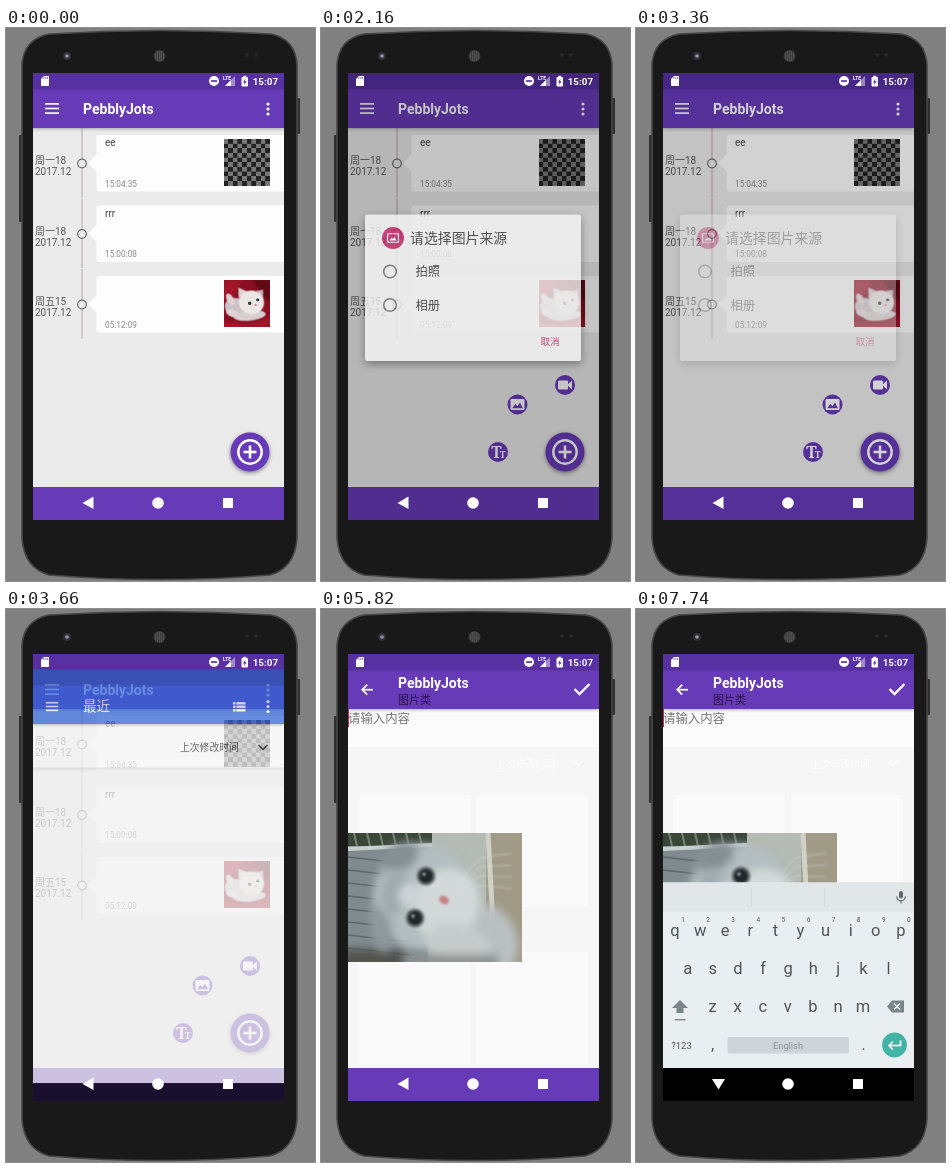
An HTML page with a canvas for the animation above (8000 ms loop, 309 px wide and 553 px high).

```html
<!DOCTYPE html>
<html lang="zh-CN">
<head>
<meta charset="utf-8">
<style>
html, body { margin: 0; width: 100%; height: 100%; overflow: hidden; background: #808080; }
canvas { display: block; width: 309px; height: 553px; }
</style>
</head>
<body>
<canvas id="stage" width="309" height="553"></canvas>
<script>
function makeCanvas(w, h) {
  const c = document.createElement('canvas');
  c.width = w;
  c.height = h;
  return c.getContext('2d');
}
const off = makeCanvas(309, 553);
let g = document.getElementById('stage').getContext('2d');

const FONT = 'Roboto, "Noto Sans CJK SC", "Noto Sans CJK", sans-serif';
const SERIF = '"Noto Serif", serif';
const PURPLE = '#673ab7', PINK = '#c8286a', WHITE = '#fff';
const TITLE = 'PebblyJots';
const clamp = v => Math.max(0, Math.min(1, v));

// Drawing helpers
function rect(x, y, w, h, color, r = 0) {
  g.fillStyle = color;
  g.beginPath();
  g.roundRect(x, y, w, h, r);
  g.fill();
}
function ellipse(x, y, rx, ry, color, turn = 0) {
  g.fillStyle = color;
  g.beginPath();
  g.ellipse(x, y, rx, ry, turn, 0, 7);
  g.fill();
}
const disc = (x, y, r, color) => ellipse(x, y, r, r, color);
function ring(x, y, r, color, width) {
  g.strokeStyle = color;
  g.lineWidth = width;
  g.beginPath();
  g.arc(x, y, r, 0, 7);
  g.stroke();
}
function trace(points) {
  g.beginPath();
  for (let i = 0; i < points.length; i += 2) g.lineTo(points[i], points[i + 1]);
}
function poly(color, ...points) {
  trace(points);
  g.fillStyle = color;
  g.fill();
}
function line(color, width, ...points) {
  trace(points);
  g.strokeStyle = color;
  g.lineWidth = width;
  g.stroke();
}
function text(s, x, y, size, color, weight = 400, align = 'left', family = FONT) {
  g.font = `${weight} ${size}px ${family}`;
  g.textAlign = align;
  g.fillStyle = color;
  g.fillText(s, x, y);
}
function shadow(blur, dy, strength, draw) {
  g.save();
  g.shadowColor = `rgba(0,0,0,${strength})`;
  g.shadowBlur = blur;
  g.shadowOffsetY = dy;
  draw();
  g.restore();
}
// Runs a drawing on another canvas
function drawOn(target, draw) {
  const front = g;
  g = target;
  draw();
  g = front;
  return target.canvas;
}
function layer(alpha, dy, draw) {
  off.clearRect(0, 0, 309, 553);
  drawOn(off, draw);
  g.save();
  g.globalAlpha = alpha;
  g.drawImage(off.canvas, 0, dy);
  g.restore();
}
// Centre-crops a picture into a box
function photo(pic, x, y, w, h) {
  const cut = pic.height * w / h;
  g.drawImage(pic, (pic.width - cut) / 2, 0, cut, pic.height, x, y, w, h);
}
const soften = px => g.filter = px ? `blur(${px}px)` : 'none';

// Pictures
function whiteKitten() {
  rect(0, 0, 110, 110, '#8a0f22');
  soften(3);
  poly('#a3162a', 0, 0, 45, 0, 20, 40, 0, 50);
  poly('#5f0913', 70, 0, 110, 0, 110, 50, 90, 35);
  poly('#a01528', -5, 98, 60, 104, 115, 86, 115, 115, -5, 115);
  soften(1.5);
  ellipse(36, 68, 34, 24, '#cdc3c7', .35);
  ellipse(62, 84, 38, 12, '#d8cfd0', -.1);
  poly('#dcd2d2', 36, 44, 35, 18, 56, 27);
  poly('#cdb7ba', 76, 26, 94, 23, 93, 50);
  ellipse(66, 53, 30, 28, '#ece6e5', .3);
  ellipse(16, 46, 8, 15, '#e0d4d5', -.5);
  ellipse(20, 78, 14, 8, '#e2d5d5', .3);
  soften(.5);
  disc(62, 55, 4, '#34343a');
  disc(81, 47, 3.6, '#34343a');
  ellipse(76, 59, 3, 2, '#d58c90');
  soften(0);
}
function greyCat() {
  rect(0, 0, 174, 129, '#a9b0ae');
  rect(0, 0, 80, 129, '#7f8b8f');
  soften(.7);
  for (let y = 24; y < 140; y += 13) line('#5d686c', 1.5, 0, y, 62, y + 7);
  rect(0, 0, 84, 13, '#39463a');
  for (let x = 6; x < 84; x += 13) line('#78846f', 2, x, 0, x + 3, 13);
  line('#c9d1cf', 4, 0, 16, 84, 12);
  rect(84, 0, 54, 129, '#b4bab4');
  rect(138, 0, 40, 129, '#a09a87');
  line('#cfd0c6', 5, 140, 0, 147, 129);
  soften(4);
  rect(-5, 116, 60, 20, '#54534f');
  ellipse(128, 112, 42, 42, '#b9c0c0', .5);
  ellipse(75, 64, 50, 53, '#b3bec2', .3);
  ellipse(52, 24, 20, 13, '#858f94', -.5);
  ellipse(33, 96, 10, 24, '#8f999d', -.2);
  ellipse(46, 60, 13, 24, '#a0abb0', .2);
  ellipse(98, 72, 33, 37, '#d3d9d9', .4);
  ellipse(110, 112, 34, 20, '#c6cccb', .3);
  ellipse(62, 62, 12, 12, '#ccd4d6');
  rect(60, 122, 90, 14, '#8d9190');
  soften(.8);
  for (const [x, y] of [[78, 43], [67, 85]]) {
    disc(x, y, 9.5, '#6c7472');
    disc(x, y, 7, '#20272a');
    disc(x - 2, y - 2, 1.5, '#cfd7d8');
  }
  ellipse(96, 67, 5, 4, '#c48084', .5);
  for (let i = 0; i < 4; i++) line('#dfe2de', .6, 107, 55 + i * 3, 132, 25 + i * 9, 164, 20 + i * 12);
  soften(0);
}
function checkers(odd) {
  rect(0, 0, 110, 110, '#222');
  for (let i = 0; i < 100; i++) {
    const x = i % 10, y = i / 10 | 0;
    if ((x + y) % 2 == odd) rect(x * 11, y * 11, 11, 11, '#777');
  }
}
function checkerShot() {
  checkers(1);
  rect(0, 88, 110, 22, '#202020');
  rect(87, 0, 23, 27, '#b81f1b');
}
function tabby() {
  rect(0, 0, 110, 110, '#d9b48c');
  soften(3);
  rect(-5, -5, 120, 38, '#e2c69c');
  rect(-5, 88, 120, 30, '#b5764f');
  soften(1.5);
  poly('#9d6c43', 8, 55, 7, 10, 38, 31);
  poly('#9d6c43', 70, 31, 103, 12, 98, 57);
  poly('#c09474', 13, 40, 12, 20, 29, 32);
  poly('#c09474', 79, 34, 97, 22, 94, 44);
  ellipse(55, 58, 48, 34, '#ac7b4c');
  for (let x = 41; x < 74; x += 8) line('#74502f', 3, x, 27, 50 + x * .1, 43);
  ellipse(55, 77, 32, 15, '#d8bd9b');
  ellipse(55, 60, 8, 14, '#c0946a');
  soften(.6);
  for (const [x, y] of [[36, 50], [76, 52]]) {
    disc(x, y, 8, '#cdb883');
    disc(x, y, 5.8, '#252a25');
    disc(x - 2, y - 2, 1.3, WHITE);
  }
  ellipse(55, 67, 5, 3.5, '#b0695a');
  line('#7d583b', 1.3, 45, 77, 55, 72, 65, 77);
  soften(0);
}
const paint = (draw, w = 110, h = 110) => drawOn(makeCanvas(w, h), draw);
const pics = {
  kitten: paint(whiteKitten),
  cat: paint(greyCat, 174, 129),
  board: paint(() => checkers(0)),
  shot: paint(checkerShot),
  tabby: paint(tabby)
};

// Icons
function menuIcon(y, w, gap) {
  for (const d of [-gap, 0, gap]) rect(46 - w / 2, y + d - .8, w, 1.6, WHITE);
}
function moreIcon(y) {
  for (const d of [-5, 0, 5]) disc(262, y + d, 1.6, WHITE);
}
function pictureIcon(x, y, w, frame, hill) {
  rect(x - w / 2, y - w * .4, w, w * .8, frame, 1.3);
  poly(hill, x - w * .38, y + w * .27, x - w * .15, y - w * .03, x, y + w * .12,
    x + w * .18, y - w * .14, x + w * .39, y + w * .27);
}

function phone() {
  rect(0, 0, 309, 553, '#808080');
  rect(13, 107, 4, 87, '#303030', 1);
  rect(290, 70, 4, 36, '#303030', 1);
  const body = new Path2D('M16 36Q18 11 43 6Q154 -1 265 6Q289 11 291 36V510Q289 540 264 547Q154 556 43 547Q18 540 16 510Z');
  g.fillStyle = '#191919';
  g.fill(body);
  g.strokeStyle = '#474747';
  g.lineWidth = 1.6;
  g.stroke(body);
  disc(61, 28, 4, '#303036');
  disc(61, 28, 1.8, '#9296ae');
  disc(153.5, 28, 6, '#3c3c3c');
  for (let y = -4; y <= 4; y += 2)
    for (let x = -4; x <= 4; x += 2)
      if (x * x + y * y < 24) rect(153 + x, 27.5 + y, 1, 1, '#686868');
  disc(241, 27, 1.8, '#2b2b2b');
  disc(250, 27, 1.8, '#2b2b2b');
}

function bars(dark, color, nav) {
  shadow(3, 1, .3, () => rect(27, 61, 251, 39, color));
  rect(27, 45, 251, 16.5, dark);
  rect(27, 459, 251, 34, nav);
}

function systemIcons(down) {
  poly(WHITE, 35, 51, 38, 48, 43, 48, 43, 58, 35, 58);
  for (const x of [37.5, 39.5, 41.3]) rect(x, 49, .8, 2, '#704fae');
  disc(208, 53, 5, WHITE);
  rect(205, 52.2, 6, 1.7, '#5931a4');
  poly('rgba(255,255,255,.45)', 219, 58, 229, 58, 229, 48);
  poly(WHITE, 219, 58, 225, 58, 225, 52);
  text('LTE', 217, 52, 5, WHITE, 700);
  rect(235.5, 49, 6.5, 9.5, WHITE, 1);
  rect(237.3, 47.8, 3, 2, WHITE);
  poly('#5931a4', 239.5, 50.5, 237, 54.5, 238.5, 54.5, 238, 57.3, 240.6, 53.3, 239, 53.3);
  text('15:07', 272, 57, 9.8, WHITE, 700, 'right');
  if (down) poly(WHITE, 76, 470, 89, 470, 82.5, 480.5);
  else poly(WHITE, 76.5, 475, 87.5, 468.5, 87.5, 481);
  disc(152, 475, 5.8, WHITE);
  rect(217, 470, 10, 10, WHITE);
}

// Screens
function notes(open) {
  rect(27, 100, 251, 360, '#ebebeb');
  [['周一18', 'ee', '15:04:35', pics.board], ['周一18', 'rrr', '15:00:08'],
   ['周五15', '', '05:12:09', pics.kitten]].forEach(([day, note, time, pic], i) => {
    const y = 100 + i * 70.5;
    rect(75.5, y, 1, 69.5, '#b5a5a5');
    rect(90.5, y + 7, 188, 56.5, '#fdfdfd', [3, 0, 0, 3]);
    poly('#fdfdfd', 82, y + 35, 91, y + 26, 91, y + 44);
    disc(76, y + 35.5, 4.5, '#ebebeb');
    ring(76, y + 35.5, 4.3, '#6b6b6b', 1.2);
    text(day, 29, y + 36, 10, '#555');
    text('2017.12', 29, y + 47, 10, '#555');
    text(note, 99, y + 18, 10, '#444');
    text(time, 99, y + 58.5, 8.3, '#8a8a8a');
    if (pic) photo(pic, 217.5, y + 11, 46.5, 46.5);
  });
  bars('#5730a2', PURPLE, PURPLE);
  menuIcon(80.5, 14, 4.6);
  text(TITLE, 77, 86, 14, WHITE, 700);
  moreIcon(81);
  if (open) {
    const x = 244 - 67 * open, d = 47.5 * open, top = 424 - 67 * open;
    disc(x, 424, 10, PURPLE);
    text('T', x - 1.5, 430, 16, WHITE, 700, 'center', SERIF);
    text('T', x + 4.8, 430, 9, WHITE, 700, 'center', SERIF);
    disc(244 - d, 424 - d, 10, PURPLE);
    pictureIcon(244 - d, 424 - d, 14, WHITE, PURPLE);
    disc(244, top, 10, PURPLE);
    rect(237, top - 4.5, 10, 9, WHITE, 1.2);
    poly(WHITE, 246, top, 251, top - 4.5, 251, top + 4.5);
  }
  shadow(4, 1.5, .45, () => disc(244, 424, 19.5, PURPLE));
  ring(244, 424, 11.7, WHITE, 2.4);
  rect(237.5, 422.7, 13, 2.6, WHITE);
  rect(242.7, 417.5, 2.6, 13, WHITE);
}

function dialog() {
  shadow(8, 3, .45, () => rect(44, 186.5, 216, 146.5, '#f6f6f6', 2));
  disc(72, 210, 11, PINK);
  pictureIcon(72, 210, 12, WHITE, PINK);
  rect(67.2, 206.4, 9.6, 7.2, PINK);
  pictureIcon(72, 210, 9, PINK, WHITE);
  text('请选择图片来源', 89, 215, 13.9, '#333');
  ['拍照', '相册'].forEach((label, i) => {
    ring(69, 243.5 + i * 33.5, 6.3, '#707070', 1.6);
    text(label, 94.5, 248 + i * 33.5, 12.3, '#333');
  });
  text('取消', 219.5, 317, 9.6, PINK);
}

function picker(filled, barColor) {
  rect(27, 100, 251, 360, '#f0f0f0');
  if (filled) {
    [['ef0f1bdcd3...', '64.17 kB 12月1...', pics.kitten],
     ['8879bbadc...', '15.14 kB 12月1...', pics.cat],
     ['IMG_20171...', '7.46 kB 12月14日', pics.shot],
     ['175794eb2...', '419 kB 12月14日', pics.tabby]].forEach(([name, info, pic], i) => {
      const x = 37.5 + i % 2 * 118, y = 155 + (i >> 1) * 156.5;
      shadow(2, 1, .3, () => rect(x, y, 111, 148.5, '#f6f6f6', 1));
      photo(pic, x, y, 111, 110.5);
      pictureIcon(x + 18.5, y + 130, 12, '#db4437', '#f6f6f6');
      text(name, x + 35, y + 128, 11, '#444');
      text(info, x + 35, y + 141, 8.2, '#555');
    });
    rect(272, 142, 6, 117, barColor);
  }
  shadow(3, 1, .15, () => rect(27, 100, 251, 43.5, '#f5f5f5'));
  text('上次修改时间', 174, 127, 9.8, '#333');
  line('#333', 1.7, 252.5, 121, 257, 125.5, 261.5, 121);
  bars('#2b58b4', '#3464d4', '#000');
  menuIcon(82.5, 12.5, 3.8);
  text('最近', 77, 87, 13.5, WHITE);
  for (const y of [78, 81.5, 85]) {
    rect(227, y, 2.5, 2.5, WHITE);
    rect(230.3, y, 9.2, 2.5, WHITE);
  }
  moreIcon(82.5);
}

function editor(settled, cursor) {
  rect(27, 100, 251, 360, '#fbfbfb');
  if (settled) {
    rect(27, 138, 251, 322, '#f6f6f6');
    for (const x of [37, 155])
      for (const y of [186, 343]) rect(x, y, 112, 112, '#fafafa');
    text('上次修改时间', 175, 159, 9.8, '#fdfdfd');
    line('#fdfdfd', 1.7, 252.5, 152, 257, 156.5, 261.5, 152);
  }
  bars('#5730a2', PURPLE, PURPLE);
  line(WHITE, 1.7, 52, 80.7, 41.5, 80.7);
  line(WHITE, 1.7, 46.2, 75.7, 41.2, 80.7, 46.2, 85.7);
  text(TITLE, 77, 79, 14, WHITE, 700);
  text('图片类', 77, 94.5, 11, '#281347');
  line(WHITE, 2.3, 253.5, 80, 258.5, 85, 268.5, 75);
  text('请输入内容', 27, 114, 12.4, '#777');
  if (cursor) rect(27, 100, 1, 18, PINK);
  photo(pics.cat, 27, 224, 174, 129);
}

function keyboard() {
  const ink = '#4b555a';
  rect(27, 273.5, 251, 190, '#e9eef0');
  rect(27, 273.5, 251, 29, '#e1e6e8');
  rect(115, 279, 1, 18, '#d0d6d8');
  rect(188, 279, 1, 18, '#d0d6d8');
  rect(263, 282, 4, 7.5, '#5f686c', 2);
  g.strokeStyle = '#5f686c';
  g.lineWidth = 1.2;
  g.beginPath();
  g.arc(265, 287.5, 4.3, 0, Math.PI);
  g.stroke();
  rect(264.4, 291.5, 1.2, 3, '#5f686c');
  [['qwertyuiop', 39, 326.5], ['asdfghjkl', 51.7, 365], ['zxcvbnm', 76.5, 403]].forEach(([keys, x, y], row) =>
    [...keys].forEach((key, i) => {
      text(key, x + i * 25.1, y, 16.5, ink, 400, 'center');
      if (!row) text((i + 1) % 10, x + 8 + i * 25.1, 313, 6.5, '#6c767a', 500, 'center');
    }));
  poly('#7b868a', 44, 391, 52, 399, 47.5, 399, 47.5, 404, 40.5, 404, 40.5, 399, 36, 399);
  rect(39, 410, 10.5, 1.4, '#7b868a');
  poly('#7b868a', 251, 397.5, 256, 391.5, 268, 391.5, 268, 403.5, 256, 403.5);
  line('#e9eef0', 1.4, 258, 394.5, 264, 400.5);
  line('#e9eef0', 1.4, 264, 394.5, 258, 400.5);
  text('?123', 45.5, 439.5, 9.5, ink, 400, 'center');
  text(',', 76.5, 441, 16, ink, 400, 'center');
  rect(91.5, 428, 121.5, 16.5, '#ced4d7', 2);
  text('English', 152, 439.5, 9.3, '#8a9397', 400, 'center');
  text('.', 227.5, 441, 16, ink, 400, 'center');
  disc(258.5, 436, 12.4, '#42b4a6');
  line(WHITE, 1.6, 264.5, 431.5, 264.5, 436.5, 253, 436.5);
  line(WHITE, 1.6, 257, 432.5, 253, 436.5, 257, 440.5);
}

function overshoot(p) {
  const s = 1.2, q = p - 1;
  return 1 + q * q * ((s + 1) * q + s);
}

function scene(t) {
  phone();
  g.save();
  g.beginPath();
  g.rect(27, 45, 251, 447);
  g.clip();
  if (t < 4980) {
    notes(t < 900 ? 0 : overshoot(clamp((t - 840) / 540)));
  } else {
    editor(t >= 5160, (t - 4860) % 960 < 480);
  }
  if (t >= 2100 && t < 3420) {
    const p = clamp((t - 2040) / 240), q = clamp((t - 3120) / 300);
    const dim = .6 * p ** 1.4 * (1 - q ** 1.5);
    rect(27, 45, 251, 447, `rgba(0,0,0,${dim})`);
    layer((1 - (1 - p) ** 2.3) * (1 - q) ** .7, 0, dialog);
  }
  if (t >= 3600 && t < 5160) {
    const p = clamp((t - 3540) / 420), q = clamp((t - 4920) / 240);
    const dy = 36 * ((1 - p) ** 2.6 + q ** 2.5);
    layer(Math.min(1, p * 2.6) * (1 - q ** 1.6), dy,
      () => picker(t >= 3780, t < 4140 ? '#bcbcbc' : '#d0d0d0'));
  }
  if (t >= 7140) {
    const p = clamp((t - 7080) / 180);
    layer(Math.min(1, p * 1.5), 90 * (1 - p) ** 2, keyboard);
    rect(27, 459, 251, 34, '#000');
  }
  g.restore();
  systemIcons(t >= 6960);
}

function frame() {
  const t = performance.now() % 8000;
  scene(Math.floor(t / 60) * 60); // the screen refreshes every 60 ms
  requestAnimationFrame(frame);
}
frame();
</script>
</body>
</html>
```
